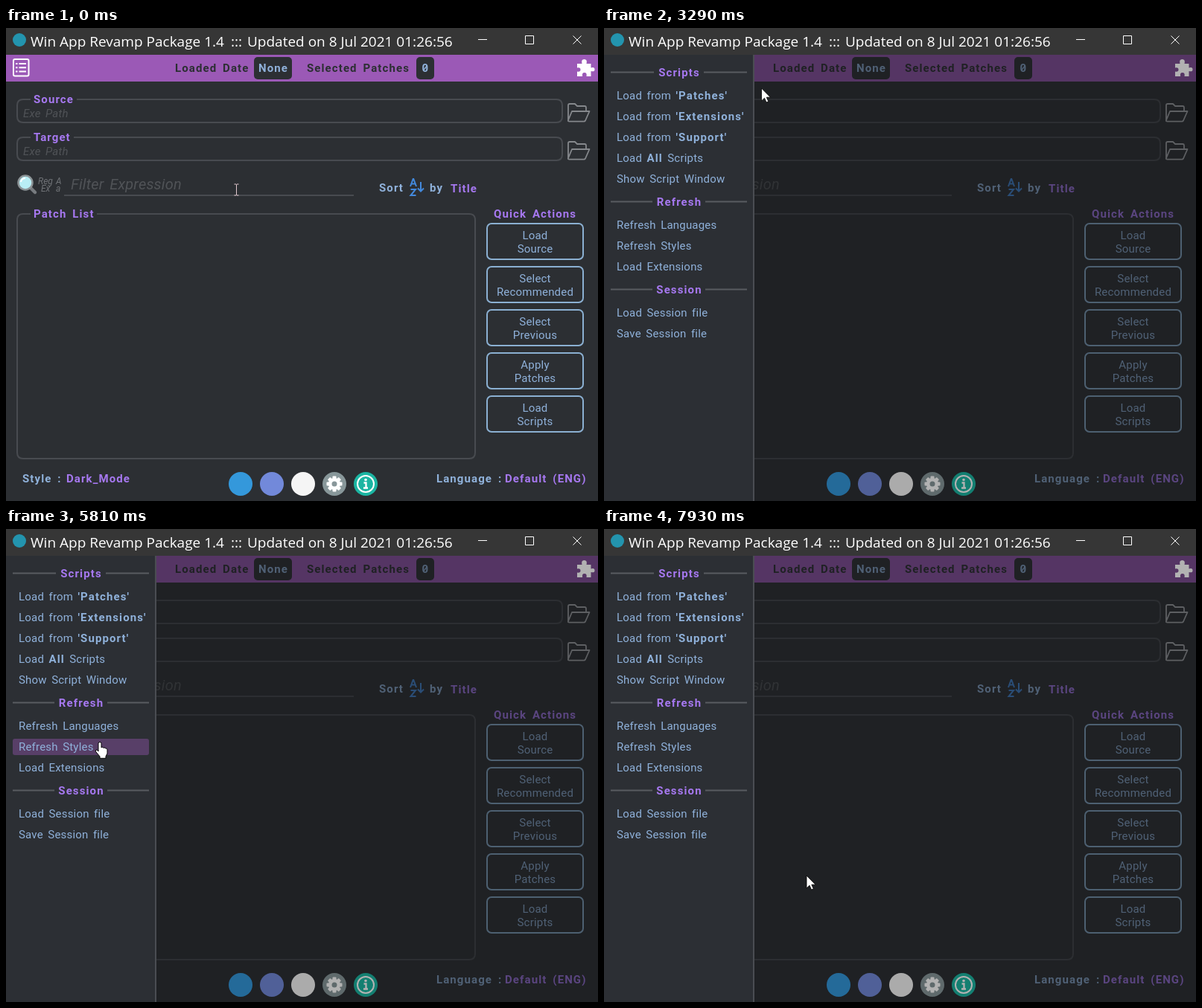
Animation, 795 px wide and 636 px high, one loop 8 s. Source, as an HTML page:

```html
<!DOCTYPE html>
<html lang="en">
<head>
<meta charset="utf-8">
<title>Win App Revamp Package</title>
<style>
  html, body { margin: 0; width: 100%; height: 100%; overflow: hidden; background: #2c2f33; }
  svg { display: block; width: 100%; height: 100%; }
  text { font: 15px Roboto, sans-serif; letter-spacing: .2px; word-spacing: 2.5px; fill: #8fb1da; white-space: pre; }
  .b { font-weight: 700; letter-spacing: 1.1px; word-spacing: 3px; }
  .p { fill: #a678f0; }
  .d { fill: #2c2f33; }
  .i { font-style: italic; fill: #505357; }
  .s { font-size: 12px; fill: #6f7276; letter-spacing: 0; }
  .f { font-size: 20px; }
  .w { font: 19px "Open Sans", "Noto Sans", sans-serif; fill: #fff; letter-spacing: 0; word-spacing: 0; }
  .m { text-anchor: middle; }
  .edge { fill: none; stroke: #484b50; stroke-width: 2; }
</style>
</head>
<body>
<svg id="stage" viewBox="0 0 795 636"></svg>
<script>
const STEP = 126, LOOP = 8000;

// Markup helpers
const text = (x, y, s, c = '') => `<text x="${x}" y="${y}" class="${c}">${s}</text>`;
const rect = (x, y, w, h, rest) => `<rect x="${x}" y="${y}" width="${w}" height="${h}" ${rest}/>`;
const disc = (x, y, r, fill) => `<circle cx="${x}" cy="${y}" r="${r}" fill="${fill}"/>`;
const path = (d, rest) => `<path d="${d}" ${rest}/>`;
const bold = s => `<tspan class="b">${s}</tspan>`;

// Rounded frame whose top edge is broken by a legend
const fieldset = (y, h, w, gap, label) =>
  path(`M33 ${y}H23q-8 0-8 8v${h - 16}q0 8 8 8h${w - 16}q8 0 8-8v${16 - h}q0-8-8-8H${gap}`, 'class="edge"') +
  text(37, y + 5, label, 'b p');

const folder = y => path(
  `M755 ${y + 23}v-20q0-2 2-2h7l3 3h10q2 0 2 2v5M755 ${y + 23}l5-12h23.5l-5.5 12.5q-.6 1.2-2 1.2h-19.500q-2 0-1.500-1.700z`,
  'fill="none" stroke="#85888c" stroke-width="1.8" stroke-linejoin="round"');

const button = ([a, b], n) => {
  const y = 263 + n * 58;
  return rect(646, y, 129, 48, 'rx="6" fill="none" stroke="#8bb0d2" stroke-width="2"') +
    text(710.5, y + 21, a, 'm') + text(710.5, y + 39, b, 'm');
};

const gear = () => {
  let teeth = '';
  for (let a = 0; a < 360; a += 45)
    teeth += rect(438.500, 602.500, 5, 6, `rx="1" fill="#fff" transform="rotate(${a} 441 613)"`);
  return disc(441, 613, 16, '#88979a') + teeth + disc(441, 613, 8, '#fff') + disc(441, 613, 3.500, '#88979a');
};

const titleBar =
  rect(0, 0, 795, 36, 'fill="#363636"') + disc(18, 16, 9, '#2394ae') +
  text(33, 25, 'Win App Revamp Package 1.4', 'w') + text(302, 25, ':::', 'w') +
  text(324, 25, 'Updated on 8 Jul 2021 01:26:56', 'w') +
  path('M634 15.5h12M697.5 10.5h11v11h-11zM761.500 10.500l11 11m0-11l-11 11', 'fill="none" stroke="#fff"');

const listIcon =
  `<g id="list" fill="none" stroke="#fff" stroke-width="2">` +
  rect(10, 42, 20.500, 22.500, 'rx="2"') +
  path('M17.500 48H27M17.500 53.300H27M17.500 58.600H27M13 48h2.500M13 53.300h2.500M13 58.600h2.500', '') + '</g>';

const header =
  rect(0, 36, 795, 36, 'fill="#9b59b6"') + listIcon +
  text(227, 59, 'Loaded Date', 'b d') + rect(333, 39, 51, 30, 'rx="5" fill="#2c2f33"') + text(339, 59, 'None', 'b') +
  text(404, 59, 'Selected Patches', 'b d') + rect(551, 39, 24, 30, 'rx="5" fill="#2c2f33"') +
  text(558.500, 59, '0', 'b') + path('M561 56.500l4-5.500', 'stroke="#8fb1da" stroke-width="1.3"');

const fields =
  fieldset(96, 31, 732, 95, 'Source') + text(23, 120, 'Exe Path', 'i') +
  fieldset(147, 31, 732, 91, 'Target') + text(23, 171, 'Exe Path', 'i');

const filter =
  path('M33 215l6 6', 'stroke="#777b7f" stroke-width="4.500" stroke-linecap="round"') +
  '<circle cx="26" cy="208" r="9.500" fill="#b9eef5" stroke="#8d9497" stroke-width="2.500"/>' +
  path('M20 207q1-5 6-5', 'fill="none" stroke="#fff" stroke-width="2"') +
  text(43, 210, 'Reg', 'i s') + text(47, 220, 'Ex', 'i s') + text(67, 210, 'A', 'i s') + text(67, 220, 'a', 'i s') +
  text(87, 217, 'Filter Expression', 'i f') + path('M78 225H467', 'class="edge"') +
  text(501, 220, 'Sort', 'b') +
  path('M543 213l3.700-10h.6l3.700 10m-6.500-3.500h5M543.500 217h6.500l-6.500 8h7M557 207v12m-4-3.500l4 4 4-4',
    'fill="none" stroke="#4389dc" stroke-width="2"') +
  text(569, 220, 'by', 'b') + text(597, 221, 'Title', 'b p');

const buttons = [['Load', 'Source'], ['Select', 'Recommended'], ['Select', 'Previous'],
  ['Apply', 'Patches'], ['Load', 'Scripts']].map(button).join('');

const body =
  fieldset(250, 329, 615, 122, 'Patch List') + text(655, 255, 'Quick Actions', 'b p') + buttons +
  text(22, 611, 'Style :', 'b') + text(81, 611, 'Dark_Mode', 'b p') +
  text(578, 611, 'Language :', 'b') + text(670, 611, 'Default (ENG)', 'b p');

const icons =
  path('M767 48h6.500q-1.500-6 3-6t3 6h6v5.500q5-1.500 5 2.200t-5 2.200V65h-6q1-5-2.700-5t-2.700 5h-7.100v-6.500q4.500 1 4.500-2.500t-4.500-2.500z', 'fill="#fff"') +
  folder(101) + folder(152) +
  disc(315, 613, 16, '#3498db') + disc(357, 613, 16, '#7289da') + disc(399, 613, 16, '#f5f5f5') + gear() +
  disc(483, 613, 16, '#1bb5a2') +
  '<circle cx="483" cy="613" r="11" fill="none" stroke="#fff" stroke-width="2"/>' + disc(483, 607.500, 1.800, '#fff') +
  path('M480.500 611.500h3v7m-3.500 0h6', 'fill="none" stroke="#fff" stroke-width="2.300"');

const heading = (y, label, gap) =>
  path(`M9 ${y}H${100.5 - gap}M${100.5 + gap} ${y}H192`, 'stroke="#595c61" stroke-width="2"') +
  text(101, y + 5.500, label, 'b p m');

const items = [
  [91, 'Load from ' + bold("'Patches'")], [119, 'Load from ' + bold("'Extensions'")],
  [147, 'Load from ' + bold("'Support'")], [175, `Load ${bold('All')} Scripts`], [203, 'Show Script Window'],
  [265, 'Refresh Languages'], [293, 'Refresh Styles'], [321, 'Load Extensions'],
  [383, 'Load Session file'], [411, 'Save Session file']
];

const menu =
  rect(0, 36, 200, 600, 'fill="#2c2f34"') + rect(200, 36, 2, 600, 'fill="#4a4d52"') +
  rect(9, 0, 183, 22, 'id="hover" rx="3" fill="#9b59b6" opacity=".4"') +
  heading(59.500, 'Scripts', 33.500) + heading(233.500, 'Refresh', 35.500) + heading(351.500, 'Session', 35.500) +
  items.map(([y, s]) => text(17, y + 5, s)).join('');

const pointer =
  path('M-3-7h2.500l.5.500.5-.5H3M0-6.500V7.500M-3 8h2.500l.5-.5.5.5H3', 'id="beam" fill="none" stroke="#e3c9d0"') +
  path('M0 0V17L4 13.200 6.500 19 9.300 17.800 6.800 12.200H12z', 'id="arrow" fill="#fff" stroke="#000" stroke-width=".8"') +
  path('M4 2.500a2 2 0 0 1 4 0V8a1.800 1.800 0 0 1 3 .5 1.700 1.700 0 0 1 2.800.7 1.600 1.600 0 0 1 2.200 1.600v5l-2 4v2.500H6v-2.500L1 14q-1.500-2.500 0-3t3 2z',
    'id="hand" fill="#fff" stroke="#000" transform="translate(-5 -1)"') ;

const stage = document.getElementById('stage');
stage.innerHTML =
  rect(0, 0, 795, 636, 'fill="#2c2f33"') + `<g id="page">${header}${fields}${filter}${body}</g>` + icons +
  rect(0, 36, 795, 600, 'id="shade"') + `<g id="menu">${menu}</g>` + titleBar +
  '<circle id="click" cx="32" cy="47" r="15" fill="#dfaa2c" opacity=".8"/>' +
  `<g id="pointer">${pointer}</g>`;

const el = id => document.getElementById(id);
const set = (id, name, value) => el(id).setAttribute(name, value);
const show = (id, on) => set(id, 'visibility', on ? 'visible' : 'hidden');

// Pointer route: step, x, y
const route = [
  [2, 309.500, 217], [5, 200, 150], [8, 50, 78], [9, 22, 67], [10, 33, 49], [18, 33, 49], [20, 90, 62],
  [23, 238, 70], [24, 238, 70], [28, 185, 92], [31, 153, 129], [32, 152, 133], [38, 147, 208],
  [40, 143, 219], [41, 143, 219], [46, 125, 287], [47, 125, 287], [53, 108, 348], [54, 105, 376],
  [58, 112, 425], [61, 209, 448], [62, 209, 448], [63, 272, 466]
];

function locate(k) {
  const n = route.findIndex(p => p[0] >= k);
  if (n < 1) return route[n < 0 ? route.length - 1 : 0].slice(1);
  const [a, b] = [route[n - 1], route[n]], u = (k - a[0]) / (b[0] - a[0]);
  return [a[1] + (b[1] - a[1]) * u, a[2] + (b[2] - a[2]) * u];
}

function draw(t) {
  const k = Math.floor((t + 10) / STEP);
  const [x, y] = locate(k);
  const open = Math.min(1, Math.max(0, (k - 15) / 2));

  set('page', 'opacity', 1 - .3 * open);
  set('shade', 'opacity', .3 * open);
  set('menu', 'transform', `translate(${-202 * (1 - open)} 0)`);
  set('list', 'stroke', k >= 9 && k < 17 ? '#62c3f0' : '#fff');
  show('click', k === 14 || k === 15);

  const item = k > 18 && x >= 9 && x <= 192 && items.find(i => Math.abs(y - i[0]) <= 11);
  show('hover', item);
  if (item) set('hover', 'y', item[0] - 11);

  const hand = item || (k >= 9 && k <= 18);
  set('pointer', 'transform', `translate(${x} ${y})`);
  show('beam', k < 4);
  show('hand', hand);
  show('arrow', k >= 4 && !hand);
}

const start = performance.now();
function tick() {
  draw((performance.now() - start) % LOOP);
  requestAnimationFrame(tick);
}
tick();
</script>
</body>
</html>
```
